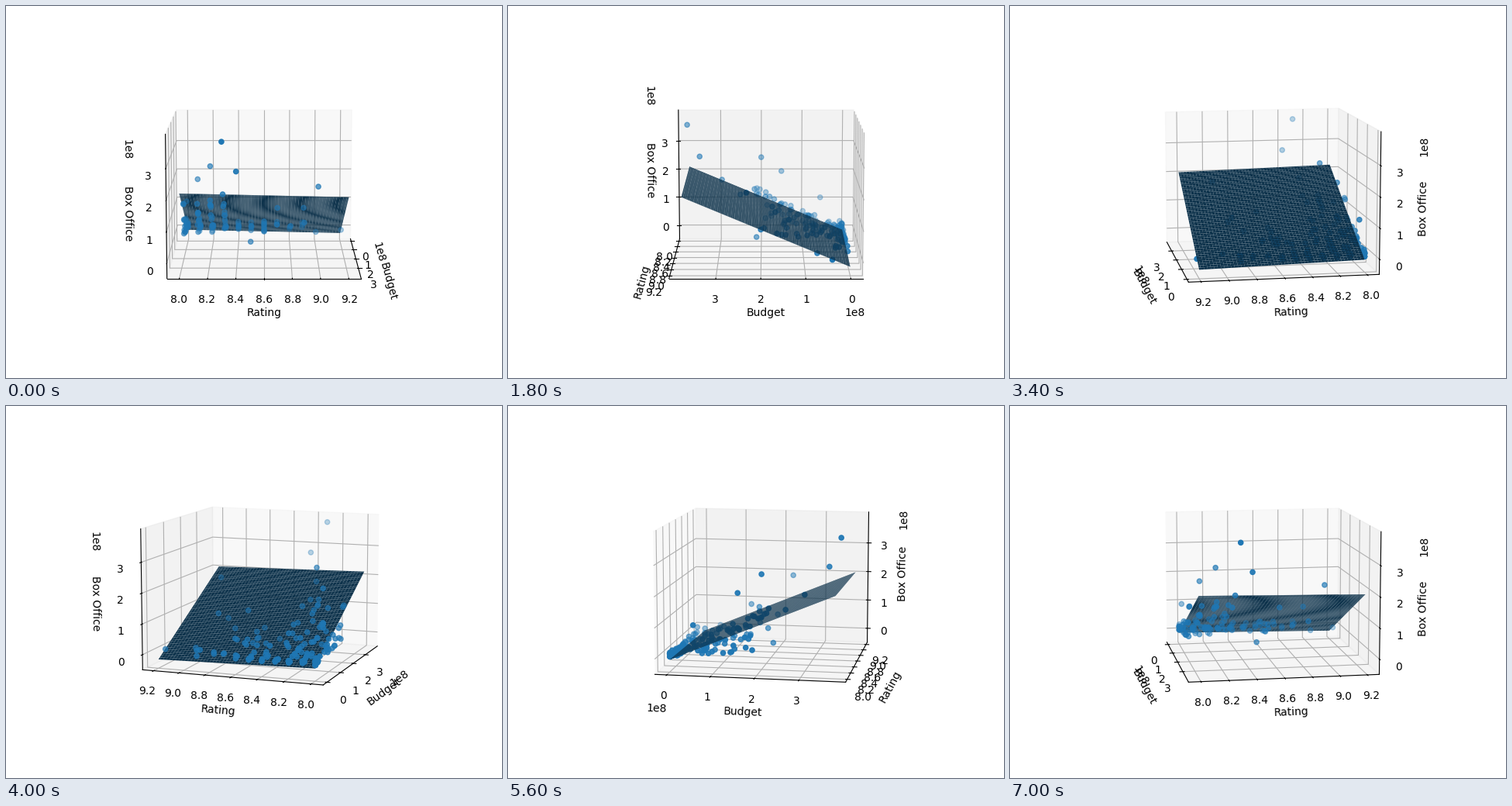
Animation, 640 px wide and 480 px high, one loop 7200 ms. Source, as a matplotlib script:

```python
import numpy as np
import matplotlib.pyplot as plt
from matplotlib.animation import FuncAnimation

FRAMES, INTERVAL = 36, 200
UNIT = 1e8
B_MAX, R_MIN, R_MAX = 3.766, 8.0, 9.2


def plane(b, r):
    """Fitted box office, in units of 1e8."""
    return -0.09 + 0.593 * b - 0.096 * (r - R_MIN)


def padded(lo, hi):
    """Limits with a 5 % margin and a further 1/48 of the widened range."""
    pad = (0.05 + 1.1 / 48) * (hi - lo)
    return lo - pad, hi + pad


def crowd(n=140):
    """Films that get rarer with rating and budget; income follows budget."""
    rng = np.random.default_rng(7)
    step = np.arange(10)
    weights = 0.76 ** step
    r = R_MIN + 0.1 * rng.choice(step, n, p=weights / weights.sum())
    b = 0.005 + 2.3 * rng.random(n) ** 2.2
    z = b * rng.uniform(0.05, 0.7, n) + 0.2 * rng.random(n) ** 4
    return np.column_stack([b, r, z])


# Budget, rating and box office of the films far from the crowd
STANDOUTS = [
    (B_MAX, 8.3, 3.78), (3.46, 8.4, 2.77), (2.0, 8.2, 2.61), (1.51, 8.1, 2.06),
    (2.94, 8.3, 1.91), (2.33, 9.0, 2.01), (2.5, 8.3, 1.4), (1.36, 8.9, 1.05),
    (0.55, 8.0, 1.06), (2.11, 8.5, 0.11), (0.72, 9.0, 0.04), (0.4, 9.2, 0.02),
]

films = np.vstack([STANDOUTS, crowd()])
z_min, z_max = plane(0, R_MAX), films[:, 2].max()

fig = plt.figure(figsize=(6.4, 4.8), dpi=100)
ax = fig.add_subplot(projection="3d")

ax.scatter(films[:, 0] * UNIT, films[:, 1], films[:, 2] * UNIT)
b, r = np.meshgrid(np.linspace(0, B_MAX, 100), np.linspace(R_MIN, R_MAX, 100))
ax.plot_surface(b * UNIT, r, plane(b, r) * UNIT)

ax.set(xlabel="Budget", ylabel="Rating", zlabel="Box Office")
ax.set_xticks(np.arange(4) * UNIT)
ax.set_yticks(np.linspace(R_MIN, R_MAX, 7))
ax.set_zticks(np.arange(4) * UNIT)
ax.set_xlim(*padded(0, B_MAX * UNIT))
ax.set_ylim(*padded(R_MIN, R_MAX))
ax.set_zlim(*padded(z_min * UNIT, z_max * UNIT))


def update(i):
    ax.view_init(elev=10, azim=360 * i / FRAMES)
    return []


anim = FuncAnimation(fig, update, frames=FRAMES, interval=INTERVAL, repeat=True)
plt.show()
```
